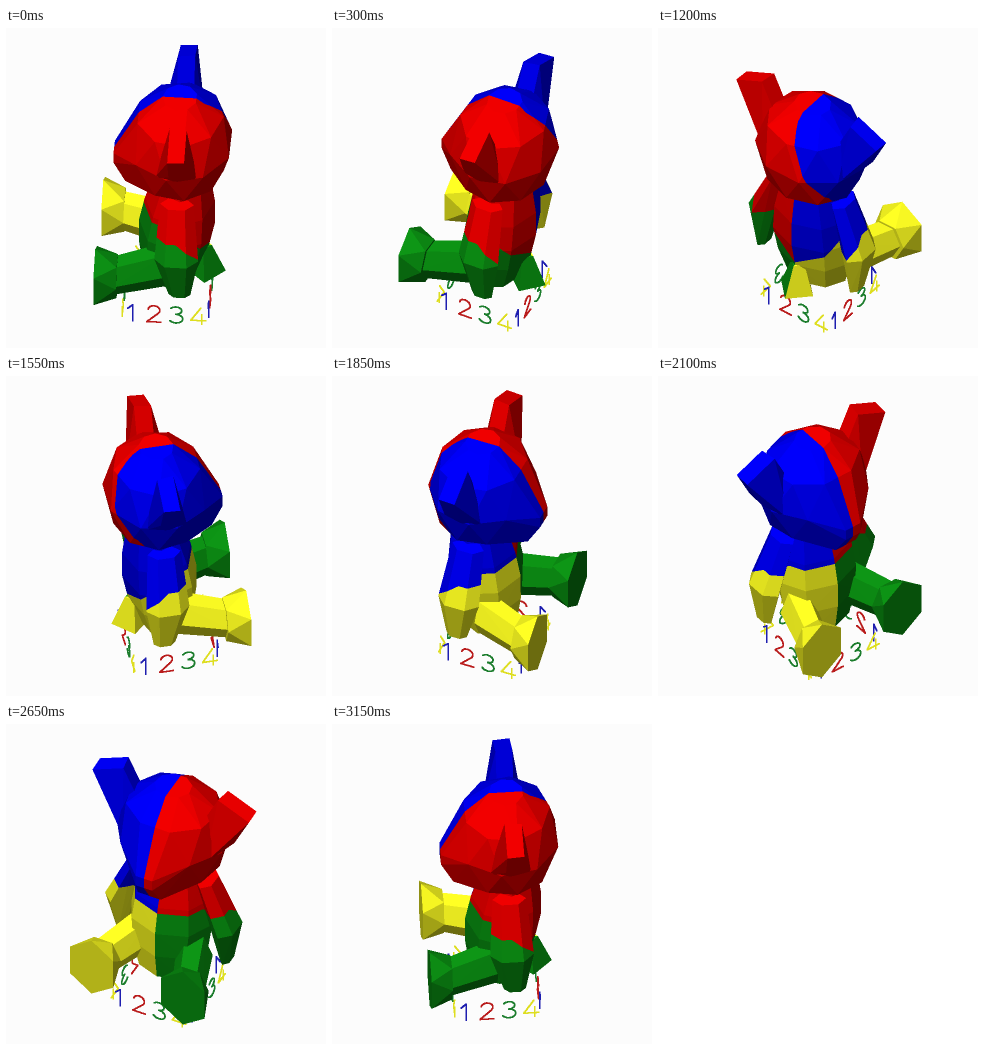
Animation, 320 px wide and 320 px high, one loop 3200 ms. Source, as an HTML page with a canvas:

```html
<!DOCTYPE html>
<html lang="en">
<head>
<meta charset="utf-8">
<title>Turning bear</title>
<style>
  html, body { margin: 0; width: 100%; height: 100%; overflow: hidden; background: #fcfcfc; }
  canvas { display: block; width: 320px; height: 320px; }
</style>
</head>
<body>
<canvas id="stage" width="640" height="640"></canvas>
<script>
const LOOP = 3200, STEP = 50, SIZE = 640, SCALE = 2;
const CX = 162, CY = 257, SIN = 0.68, COS = 0.733;
const PAPER = 0xfffcfcfc;
const RED = [242, 0, 0], BLUE = [0, 0, 252], GREEN = [14, 150, 22], YELLOW = [255, 255, 36];
const PAINT = [RED, BLUE, GREEN, YELLOW];
const LIGHT = [-0.2, 0.4, 0.89];

const ctx = document.getElementById('stage').getContext('2d');
const image = ctx.createImageData(SIZE, SIZE);
const pixels = new Uint32Array(image.data.buffer);
const depth = new Float32Array(SIZE * SIZE);

const clamp = (v, lo, hi) => Math.min(hi, Math.max(lo, v));
const sub = (a, b) => a.map((v, i) => v - b[i]);
const dot = (a, b) => a[0] * b[0] + a[1] * b[1] + a[2] * b[2];
const cross = (a, b) => [
  a[1] * b[2] - a[2] * b[1],
  a[2] * b[0] - a[0] * b[2],
  a[0] * b[1] - a[1] * b[0]
];
const pack = (c, k) => (255 << 24 | c[2] * k << 16 | c[1] * k << 8 | c[0] * k) >>> 0;

// Model points are [forward, left, up]; every part is the convex hull of a few rings.
function hull(points) {
  const faces = [], n = points.length;
  for (let i = 0; i < n; i++)
    for (let j = i + 1; j < n; j++)
      for (let k = j + 1; k < n; k++) {
        const p = points[i];
        let normal = cross(sub(points[j], p), sub(points[k], p));
        const len = Math.hypot(...normal);
        if (len < 1e-6) continue;
        normal = normal.map(v => v / len);
        let lo = 0, hi = 0;
        for (const q of points) {
          const d = dot(normal, sub(q, p));
          lo = Math.min(lo, d);
          hi = Math.max(hi, d);
        }
        if (lo < -1e-4 && hi > 1e-4) continue;
        if (hi > 1e-4) normal = normal.map(v => -v);
        faces.push({ pts: [p, points[j], points[k]], normal });
      }
  return faces;
}

const both = points => [...hull(points), ...hull(points.map(([f, l, h]) => [f, -l, h]))];

function ring(n, shift, place) {
  return Array.from({ length: n }, (_, i) => {
    const t = (i + shift) * 2 * Math.PI / n;
    return place(Math.cos(t), Math.sin(t));
  });
}

// A level ring, and an upright ring that faces forward.
const flat = ([f, l, h], rf, rl, n = 6, shift = 0) =>
  ring(n, shift, (c, s) => [f + rf * c, l + rl * s, h]);
const upright = ([f, l, h], rl, rh, n = 6, shift = 0) =>
  ring(n, shift, (c, s) => [f, l + rl * c, h + rh * s]);

function headPoints() {
  const pts = [...upright([54, 0, 178], 13, 9, 4, 0.5), ...upright([42, 0, 158], 18, 10, 4, 0.5)];
  for (let i = -2; i <= 2; i++) {
    const t = i * 0.62, r = Math.cos(t);
    pts.push(...flat([-12, 0, 197 + 63 * Math.sin(t)], 54 * r, 60 * r, 9, i % 2 / 2));
  }
  return pts;
}

function torsoPoints() {
  const pts = [];
  for (let t = 0; t <= 1; t += 0.25) {
    const bulge = Math.sin(Math.PI * t);
    pts.push(...flat([-3 - 12 * t, 0, 27 + 122 * t], 28 + 10 * bulge, 34 + 11 * bulge, 8));
  }
  return pts;
}

const ear = [
  ...upright([-23, 64, 240], 25, 25, 4, 0.22),
  ...upright([-6, 62, 238], 27, 27, 4, 0.22),
  ...flat([-12, 46, 188], 22, 6, 4)
];
const arm = [
  ...flat([-12, 38, 146], 17, 10),
  ...flat([-13, 60, 90], 22, 13),
  ...flat([-16, 58, 42], 11, 6)
];
const foot = [...upright([69, 51, 55], 28, 36, 6, 0.5), ...upright([47, 49, 54], 20, 24)];
const leg = [...upright([50, 48, 54], 18, 21), ...upright([0, 30, 56], 20, 24)];
const tail = [...flat([-38, 0, 24], 20, 20, 4), ...flat([-36, 0, 58], 8, 8, 4)];

const bear = [
  ...[headPoints(), torsoPoints(), tail].flatMap(hull),
  ...[ear, arm, foot, leg].flatMap(both)
];

// The body is painted in four quarters with slanting seams.
function quarter(f, l, h) {
  const seam = h > 150 && f < -12 ? -clamp((250 - h) * 0.5, 0, 40) : 0;
  const waist = clamp(98 + 0.86 * f + 0.4 * Math.abs(l), 57, 112);
  return (h > waist ? 0 : 2) + (l > seam ? 0 : 1);
}

const arc = (x, y, rx, ry, from, to) => Array.from({ length: 9 }, (_, i) => {
  const t = (from + (to - from) * i / 8) * Math.PI / 180;
  return [x + rx * Math.cos(t), y + ry * Math.sin(t)];
});

const digits = [
  { ink: [30, 30, 175], strokes: [[[-4, 6], [1, 11], [1, -11]]] },
  { ink: [185, 28, 28], strokes: [[...arc(0, 5, 6, 6, 170, -40), [-7, -11], [7, -11]]] },
  { ink: [28, 125, 45], strokes: [[...arc(0, 6, 6, 5, 150, -90), ...arc(0, -5, 7, 6, 90, -150)]] },
  { ink: [222, 222, 32], strokes: [[[3, 11], [-7, -6], [8, -6]], [[4, 2], [4, -11]]] }
];

// Steady turn with a slower start, in radians.
const turnAt = frame => (5.85 * frame - 13.5 + 18 * Math.exp(-frame / 5)) * Math.PI / 180;

// Rotates about the upright axis, then tilts into view space.
function view([f, l, h], c, s) {
  const x = -f * c - l * s, z = -f * s + l * c;
  return [x, h * COS - z * SIN, z * COS + h * SIN];
}

const toScreen = ([x, y, z]) => [(CX + x) * SCALE, (CY - y) * SCALE, z];

function fillFace({ pts, normal }, c, s) {
  const n = view(normal, c, s);
  if (n[2] <= 0) return;
  const shade = Math.min(1, 0.42 + 0.64 * Math.max(0, dot(n, LIGHT)));
  const inks = PAINT.map(p => pack(p, shade));
  const [A, B, C] = pts.map(p => toScreen(view(p, c, s)));
  const [a, b, d] = pts;
  const area = (B[0] - A[0]) * (C[1] - A[1]) - (C[0] - A[0]) * (B[1] - A[1]);
  if (Math.abs(area) < 1e-6) return;
  const [x0, y0] = [0, 1].map(k => Math.max(0, Math.floor(Math.min(A[k], B[k], C[k]))));
  const [x1, y1] = [0, 1].map(k => Math.min(SIZE - 1, Math.ceil(Math.max(A[k], B[k], C[k]))));
  for (let y = y0; y <= y1; y++)
    for (let x = x0; x <= x1; x++) {
      const px = x + 0.5 - A[0], py = y + 0.5 - A[1];
      const v = (px * (C[1] - A[1]) - (C[0] - A[0]) * py) / area;
      const w = ((B[0] - A[0]) * py - px * (B[1] - A[1])) / area;
      const u = 1 - v - w;
      if (u < 0 || v < 0 || w < 0) continue;
      const z = u * A[2] + v * B[2] + w * C[2], at = y * SIZE + x;
      if (z <= depth[at]) continue;
      depth[at] = z;
      pixels[at] = inks[quarter(
        u * a[0] + v * b[0] + w * d[0],
        u * a[1] + v * b[1] + w * d[1],
        u * a[2] + v * b[2] + w * d[2]
      )];
    }
}

function drawLine(from, to, ink) {
  const n = Math.ceil(Math.hypot(to[0] - from[0], to[1] - from[1])) + 1;
  for (let i = 0; i <= n; i++) {
    const [x, y, z] = from.map((v, k) => v + (to[k] - v) * i / n);
    for (let dy = -1; dy <= 1; dy++)
      for (let dx = -1; dx <= 1; dx++) {
        const px = Math.round(x) + dx, py = Math.round(y) + dy, at = py * SIZE + px;
        if (px < 0 || py < 0 || px >= SIZE || py >= SIZE || z < depth[at]) continue;
        depth[at] = z;
        pixels[at] = ink;
      }
  }
}

// The digits stand in a square, one row along each side.
function drawDigits(angle) {
  for (let side = 0; side < 4; side++) {
    const b = angle + side * Math.PI / 2, c = Math.cos(b), s = Math.sin(b);
    digits.forEach(({ ink, strokes }, i) => {
      const color = pack(ink, 1);
      for (const stroke of strokes) {
        const pts = stroke.map(([u, h]) => toScreen(view([33 - 22 * i - u, 43, h], c, s)));
        for (let k = 1; k < pts.length; k++) drawLine(pts[k - 1], pts[k], color);
      }
    });
  }
}

function render(frame) {
  const angle = turnAt(frame), c = Math.cos(angle), s = Math.sin(angle);
  pixels.fill(PAPER);
  depth.fill(-1e9);
  for (const face of bear) fillFace(face, c, s);
  drawDigits(angle);
  ctx.putImageData(image, 0, 0);
}

let shown = -1;
function tick() {
  const frame = Math.floor(performance.now() % LOOP / STEP);
  if (frame !== shown) render(shown = frame);
  requestAnimationFrame(tick);
}
tick();
</script>
</body>
</html>
```
